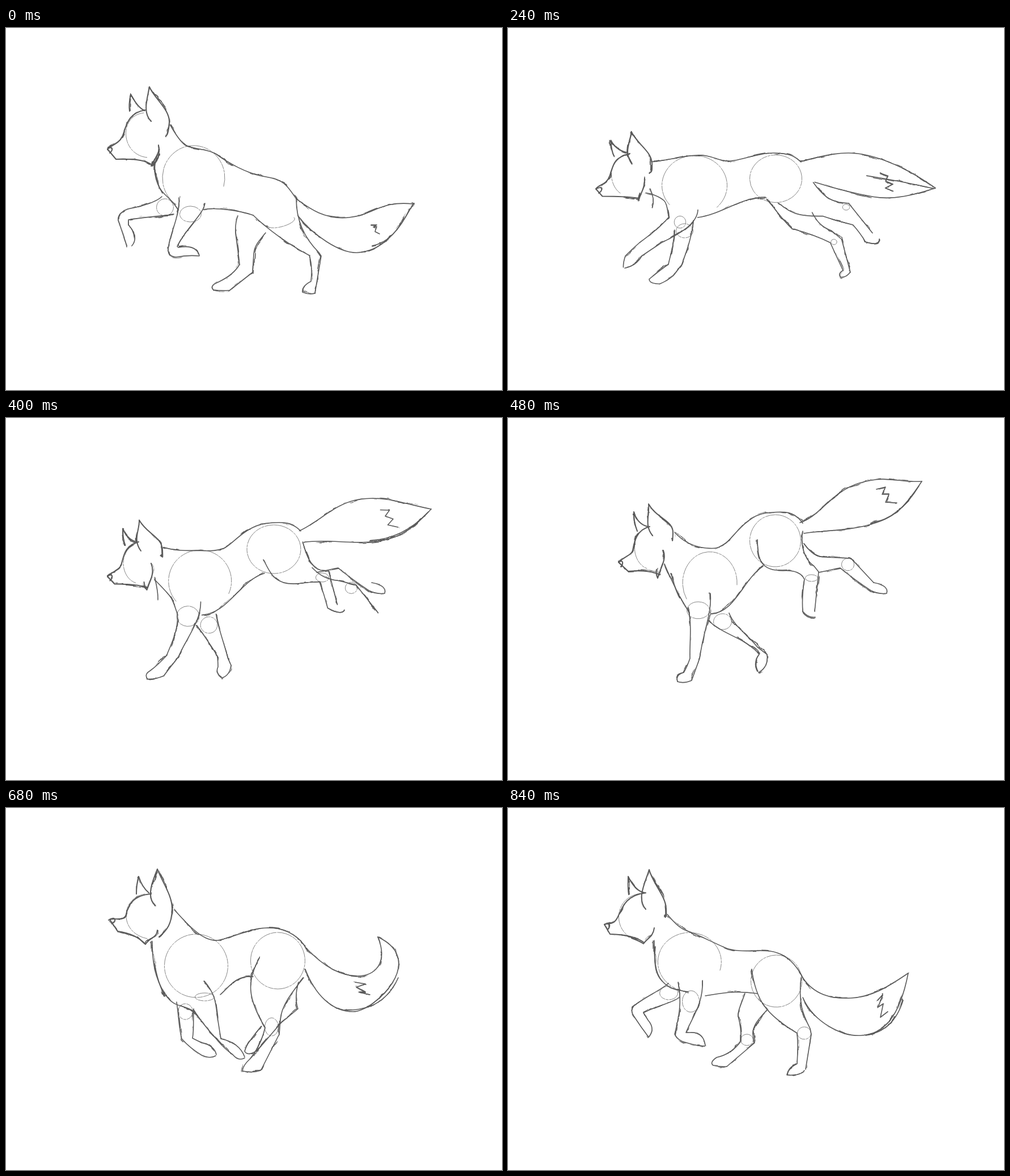
An HTML page without scripts for the animation above (880 ms loop, 875 px wide and 640 px high).

```html
<!DOCTYPE html>
<html lang="en">
<head>
<meta charset="utf-8">
<title>Running fox sketch</title>
<style>
html, body { margin: 0; width: 100%; height: 100%; overflow: hidden; background: #fff; }
svg { display: block; width: 100%; height: 100%; }
path { fill: none; stroke: #5a5a5a; stroke-width: 1.6; stroke-linecap: round; stroke-linejoin: round; }
.bold path { stroke-width: 2; }
.guide path { stroke: #777; stroke-width: .9; stroke-dasharray: 26 1.5 9 2 4 2; }
.run path { animation: run 880ms infinite; }
.speck { stroke-width: 1; opacity: 0; animation: speck 880ms step-end infinite; }
/* Seven poses --a to --g, blended on a 40 ms beat */
@keyframes run {
  0%, to { d: var(--a); animation-timing-function: steps(4); }
  18.1818% { d: var(--b); animation-timing-function: steps(4); }
  36.3636% { d: var(--c); animation-timing-function: steps(4); }
  54.5454% { d: var(--d); animation-timing-function: steps(3); }
  68.1818% { d: var(--e); animation-timing-function: steps(2); }
  77.2727% { d: var(--f); animation-timing-function: steps(4); }
  95.4545% { d: var(--g); animation-timing-function: steps(1); }
}
@keyframes speck { 68.1818% { opacity: 1; } 72.7272% { opacity: 0; } }

.brow { --a:path('M246 145C212 150 212 178 205 192S186 207 179 214L194 232Q240 230 256 241'); --b:path('M212 198C180 205 178 220 172 239S152 255 147 264L162 279Q205 276 231 280');
  --c:path('M218 246C192 252 193 268 187 283S170 297 163 305L171 316Q210 319 232 322'); --d:path('M250 192C224 198 222 225 220 234S203 246 195 255L212 271Q248 268 268 277');
  --e:path('M268 168C236 170 229 188 225 198S200 206 192 209L203 231Q240 236 263 254'); --f:path('M256 152C222 154 215 175 212 188S190 194 183 197L197 218Q228 222 245 240');
  --g:path('M243 150C208 154 202 175 194 192S178 202 170 206L180 223Q222 224 240 238'); }
.nose { --a:path('M179 214q7-5 8-1t-4 8'); --b:path('M147 264q10-4 11 0t-6 8'); --c:path('M163 305q8-5 9-1t-4 8'); --d:path('M195 255q6-4 7 0t-3 8');
  --e:path('M192 209q13-4 14 0t-6 8'); --f:path('M183 197q8-4 9 0t-3 6'); --g:path('M170 206q8-4 9 0t-2 8'); }
.ear { --a:path('M256 165C240 150 250 122 253 104C262 125 290 145 288 168S284 188 283 190'); --b:path('M216 219C200 195 211 180 213 157C220 178 248 195 247 216S241 235 239 240');
  --c:path('M221 262C206 240 222 225 222 209C235 232 258 240 261 262S261 270 260 274'); --d:path('M255 208C240 190 250 170 248 152C262 178 292 180 291 204S290 211 289 213');
  --e:path('M274 201C256 180 276 158 282 131C288 152 304 172 305 190S296 225 285 243'); --f:path('M263 172C247 158 258 130 267 108C275 130 294 155 293 180S285 215 270 228');
  --g:path('M243 179C226 160 243 130 249 109C256 135 278 155 279 178S278 186 276 190'); }
.far-ear { --a:path('M218 147C216 133 219 124 220 117Q233 142 245 146'); --b:path('M181 203C174 190 174 182 173 172Q180 188 204 194');
  --c:path('M193 250C189 240 190 232 190 225Q200 243 214 246'); --d:path('M228 200C222 185 222 175 222 166Q228 187 246 192');
  --e:path('M241 171C240 158 248 146 251 138Q260 152 262 167'); --f:path('M230 152C230 140 232 128 234 121Q240 140 252 150');
  --g:path('M213 153C211 140 212 130 212 121Q225 148 242 150'); }
.cheek { --a:path('M269 207C273 220 262 228 258 244Q268 236 270 222'); --b:path('M244 250C238 262 232 268 228 284Q234 276 240 272');
  --c:path('M238 280C246 300 238 312 233 325Q228 318 225 312'); --d:path('M274 234C280 250 270 262 264 283Q260 275 262 268');
  --e:path('M285 236C278 245 268 250 264 258Q262 250 261 242'); --f:path('M267 216C266 230 254 228 246 241Q240 236 232 228');
  --g:path('M258 212C256 228 246 230 239 240Q234 236 218 230'); }
.scruff { --a:path('M262 237Q262 270 276 292'); --b:path('M265 280Q277 295 276 310'); --c:path('M237 290Q242 310 233 324'); --d:path('M288 275Q295 305 303 318');
  --e:path('M277 265Q270 295 285 320'); --f:path('M262 275Q268 310 280 332'); --g:path('M260 245Q255 290 272 306'); }
.back { --a:path('M290 172C299 188 307 200 316 207S358 213 374 225S425 258 458 263S497 280 512 302'); --b:path('M250 218C275 215 300 212 328 211S360 222 382 231S455 230 482 237S505 250 514 260');
  --c:path('M262 255C290 252 320 240 338 239S370 242 385 239S425 210 460 205S508 206 520 214'); --d:path('M294 202C310 220 328 228 350 230S372 228 383 222S420 172 455 168S505 165 520 186');
  --e:path('M305 190C318 212 332 225 350 229S378 235 395 230S440 188 475 188S525 198 532 222'); --f:path('M297 180C315 200 335 222 353 230S380 233 402 226S445 210 470 212S520 228 530 250');
  --g:path('M281 188C295 205 305 214 318 218S360 237 383 247S440 250 462 253S505 270 520 300'); }
.chest { --a:path('M266 230C256 255 268 283 280 294S298 312 304 322'); --b:path('M238 270C255 272 268 285 272 290S278 305 281 316');
  --c:path('M248 313C262 315 275 318 280 322S285 340 286 352'); --d:path('M276 258C285 280 295 300 300 310S312 330 320 345');
  --e:path('M270 258C275 285 272 310 290 328S315 345 330 348'); --f:path('M258 236C258 270 262 300 280 328S310 345 332 360');
  --g:path('M258 235C258 265 258 290 272 306S300 322 318 325'); }
.belly { --a:path('M348 321C370 317 410 322 436 331'); --b:path('M336 319C370 314 410 308 446 311'); --c:path('M333 351C385 345 410 290 462 287'); --d:path('M358 346C400 345 415 285 450 262');
  --e:path('M386 337C400 332 408 295 434 286'); --f:path('M378 330C395 315 405 296 436 298'); --g:path('M348 332C375 328 400 322 440 328'); }

.hind-front { --a:path('M436 331C462 356 500 384 535 402Q541 420 538 448Q522 456 523 467Q535 472 545 469'); --b:path('M483 330C500 345 510 347 570 349Q600 370 634 402Q638 415 646 426Q658 428 658 418');
  --c:path('M470 288C495 308 510 320 540 316Q560 312 583 294Q605 310 615 330Q652 344 652 328'); --d:path('M440 215C440 250 445 270 485 270Q515 268 523 285Q518 315 520 342Q530 354 542 352');
  --e:path('M461 239C435 275 430 300 440 320Q455 338 476 348Q455 378 439 405Q438 422 448 430'); --f:path('M447 265C425 305 425 335 457 388Q450 420 430 444Q418 455 417 465Q435 469 449 464');
  --g:path('M430 285C437 340 455 365 510 398Q512 420 510 452Q494 460 493 472Q512 474 522 466'); }
.hind-back { --a:path('M512 302C512 345 530 375 552 397L556 403L545 469'); --b:path('M550 308C570 335 585 330 598 340L612 352L658 407');
  --c:path('M527 238C545 265 555 280 570 276L590 268L628 318'); --d:path('M520 200C515 225 523 250 540 262L548 272L541 342');
  --e:path('M530 235C520 280 490 295 492 318L495 348L450 430'); --f:path('M525 300C505 325 485 350 484 375L482 400L450 463');
  --g:path('M517 300C512 345 520 365 533 390L535 400L525 462'); }
.far-hind-front { --a:path('M409 332C400 355 408 375 412 418Q402 436 375 449Q358 456 366 463Q380 465 393 464'); --b:path('M447 315C460 340 470 355 485 375Q515 390 531 414Q530 440 530 455Q512 458 516 468Q525 473 538 466');
  --c:path('M465 290C490 308 500 325 517 335Q560 338 606 345Q630 370 652 402Q650 412 658 413Q668 410 669 398'); --d:path('M548 273C560 271 570 268 586 265Q610 285 640 305Q655 312 668 310Q672 296 645 291');
  --e:path('M495 303C510 308 520 311 540 312Q525 335 518 350Q518 375 525 388Q540 392 546 368'); --f:path('M450 386C445 392 435 405 430 412Q424 420 421 430Q424 436 432 434Q440 432 446 425');
  --g:path('M418 328C410 350 405 360 406 368Q412 390 411 412Q395 435 368 441Q355 450 362 455Q375 458 386 457'); }
.far-hind-back { --a:path('M458 362C445 378 438 385 437 400L435 432L393 465'); --b:path('M515 345C515 365 517 380 530 388L547 405L540 466');
  --c:path('M558 307C575 320 590 325 612 329L630 342L668 398'); --d:path('M522 222C535 240 545 246 560 246L605 248L645 291');
  --e:path('M540 240C530 270 540 290 567 300L538 352L546 368'); --f:path('M516 308C511 325 510 340 515 355L485 380L444 428');
  --g:path('M456 358C440 375 432 385 432 400L434 416L386 457'); }
.fore-front { --a:path('M305 300C308 330 288 365 286 392Q286 404 300 405Q322 401 341 403'); --b:path('M281 317C255 325 230 335 218 345Q215 350 216 362Q214 378 207 389');
  --c:path('M286 352C287 375 260 405 246 414Q222 432 198 444Q192 452 200 457'); --d:path('M318 335C325 370 320 400 321 425Q316 440 310 450Q295 454 299 466');
  --e:path('M322 345C365 355 385 385 398 408Q405 425 420 438Q430 448 438 450'); --f:path('M332 358C345 380 360 395 374 412Q385 425 400 436Q410 448 421 442');
  --g:path('M300 308C308 345 300 375 294 400Q300 412 315 415Q335 421 347 421'); }
.fore-back { --a:path('M351 310C348 330 320 350 302 386L304 388Q335 382 341 402'); --b:path('M340 303C340 325 290 335 270 340L240 358Q238 385 212 392');
  --c:path('M330 340C328 375 290 405 270 420L232 448Q215 455 200 457'); --d:path('M357 310C360 345 345 375 338 425L324 464Q310 470 299 466');
  --e:path('M376 320C395 345 395 375 407 412L436 429Q444 438 438 450'); --f:path('M350 306C370 330 370 345 373 370L379 408Q412 415 421 440');
  --g:path('M343 305C345 345 325 370 314 397L320 397Q345 395 348 420'); }
.far-fore-front { --a:path('M275 298C265 308 240 315 215 320Q196 328 198 340Q205 360 213 385'); --b:path('M266 342C262 360 250 375 240 390Q215 410 193 426Q192 434 215 436');
  --c:path('M320 375C326 395 325 420 326 445Q310 455 305 462Q306 470 320 469'); --d:path('M353 358C375 378 400 385 420 398Q438 410 443 418Q432 432 440 447');
  --e:path('M327 350C340 370 345 400 358 420Q370 438 385 441Q400 447 408 446'); --f:path('M301 343C305 370 305 390 310 408Q325 425 345 437Q360 444 370 438');
  --g:path('M283 310C270 322 240 335 222 350Q215 358 222 368Q235 388 248 405'); }
.far-fore-back { --a:path('M295 330C275 332 240 335 216 339L216 348Q235 370 222 385'); --b:path('M303 333C300 355 285 380 270 392L246 420Q230 425 215 436');
  --c:path('M351 348C350 380 345 410 343 445L337 456Q330 470 320 469'); --d:path('M390 345C400 370 425 385 440 405L457 418Q460 440 442 450');
  --e:path('M357 368C362 385 370 395 376 412L389 413Q405 430 408 446'); --f:path('M331 355C330 375 332 390 329 407L345 415Q368 420 371 436');
  --g:path('M302 335C290 345 265 348 239 362L247 375Q260 390 249 404'); }

.tail-top { --a:path('M512 302C530 315 560 340 605 335S660 305 718 311'); --b:path('M514 258C530 268 580 262 618 274S695 310 738 356');
  --c:path('M520 214C560 190 590 170 630 172S720 190 770 210'); --d:path('M515 185C550 175 570 130 620 115S690 115 730 112');
  --e:path('M532 220C560 240 610 240 635 212S665 160 675 130'); --f:path('M530 248C560 280 590 297 620 297S675 275 656 228');
  --g:path('M520 300C540 330 570 338 605 336S665 320 706 292'); }
.tail-under { --a:path('M515 332C540 365 590 400 622 397S685 375 718 311'); --b:path('M552 310C575 335 610 340 640 347S710 345 738 356');
  --c:path('M530 235C570 230 610 245 650 250S725 245 770 210'); --d:path('M522 204C560 198 600 200 640 188S695 165 730 112');
  --e:path('M538 250C560 275 590 290 630 292S719 193 675 130'); --f:path('M528 285C545 330 575 360 612 360S745 270 656 228');
  --g:path('M520 335C540 380 590 405 625 402S690 375 706 292'); }
.tail-edge { --a:path('M646 385Q685 378 712 320'); --b:path('M620 275Q680 292 738 356'); --c:path('M645 247Q710 250 765 212'); --d:path('M640 186Q690 178 725 120');
  --e:path('M615 283Q668 288 687 236'); --f:path('M598 357Q665 360 692 300'); --g:path('M632 401Q680 395 697 340'); }
.fur { --a:path('M644 348l10 0-5 3 5 0-3 9 8 4'); --b:path('M642 314l12 5 0 10 10 1-14 7 12 4'); --c:path('M671 199l16 5-9 8 16 10-13 7 16 7'); --d:path('M650 126l16-4-6 13 12 0-6 14 20 1');
  --e:path('M633 221l3 10 7 3 5 9 6-6 1 6'); --f:path('M616 308l18 3-16 6 16 9-10 0 18 4'); --g:path('M652 340l9-10-8 22 9-6-5 24 13-10'); }

.skull { --a:path('M243 150C198 155 202 225 250 229'); --b:path('M186 204C172 215 170 245 181 266'); --c:path('M200 258C183 275 188 312 215 318'); --d:path('M248 193C215 200 216 255 245 266');
  --e:path('M243 168C220 180 222 220 248 228'); --f:path('M245 152C200 160 200 222 250 231'); --g:path('M225 153C185 165 185 222 228 234'); }
.ribs { --a:path('M300 312A55 57 0 1 1 384 280'); --b:path('M285 297A52 51 0 1 1 355 308'); --c:path('M285 328A63 55 0 1 1 382 326'); --d:path('M315 320A48 55 0 1 1 404 295');
  --e:path('M341 345A56 56 0 1 1 342 345'); --f:path('M335 335A56 56 0 1 1 336 335'); --g:path('M287 314A56 52 0 1 1 374 287'); }
.hip { --a:path('M508 335A25 8 -15 1 1 461 349'); --b:path('M472 242A42 44 0 1 1 471 242'); --c:path('M474 207A50 40 0 1 1 473 207'); --d:path('M472 171A45 46 0 1 1 471 171');
  --e:path('M478 193A52 54 0 1 1 477 193'); --f:path('M480 220A48 50 0 1 1 479 220'); --g:path('M474 260A45 46 0 1 1 473 260'); }
.shoulder { --a:path('M325 315a19 14 0 1 0 1 0z'); --b:path('M300 325a.5 .5 0 1 0 1 0z'); --c:path('M306 340a20 21 0 1 0 1 0z'); --d:path('M335 325a20 15 0 1 0 1 0z');
  --e:path('M382 346a13 16 0 1 0 1 0z'); --f:path('M350 327a17 7 0 1 0 1 0z'); --g:path('M322 323a15 19 0 1 0 1 0z'); }
.far-shoulder { --a:path('M280 302a15 15 0 1 0 1 0z'); --b:path('M285 335a16 10 0 1 0 1 0z'); --c:path('M337 357a14 15 0 1 0 1 0z'); --d:path('M378 346a16 14 0 1 0 1 0z');
  --e:path('M357 368a.5 .5 0 1 0 1 0z'); --f:path('M316 346a13 14 0 1 0 1 0z'); --g:path('M283 315a16 12 0 1 0 1 0z'); }
.hock { --a:path('M536 402a.5 .5 0 1 0 1 0z'); --b:path('M612 352a.5 .5 0 1 0 1 0z'); --c:path('M580 271a12 10 0 1 0 1 0z'); --d:path('M535 277a11 6 0 1 0 1 0z');
  --e:path('M484 339a11 11 0 1 0 1 0z'); --f:path('M468 371a12 16 0 1 0 1 0z'); --g:path('M522 387a12 11 0 1 0 1 0z'); }
.far-hock { --a:path('M412 418a.5 .5 0 1 0 1 0z'); --b:path('M531 414a.5 .5 0 1 0 1 0z'); --c:path('M618 333a10 9 0 1 0 1 0z'); --d:path('M599 248a11 11 0 1 0 1 0z');
  --e:path('M544 300a10 11 0 1 0 1 0z'); --f:path('M485 380a.5 .5 0 1 0 1 0z'); --g:path('M421 400a11 10 0 1 0 1 0z'); }
</style>
</head>
<body>
<svg viewBox="0 0 875 640">
  <!-- A second, wavering stroke of uneven pressure over each line -->
  <filter id="pencil" x="0" y="0" width="875" height="640" filterUnits="userSpaceOnUse" color-interpolation-filters="sRGB">
    <feTurbulence type="fractalNoise" baseFrequency=".035" numOctaves="3" seed="4" result="noise"/>
    <feColorMatrix in="noise" values="0 0 0 0 0  0 0 0 0 0  0 0 0 0 0  0 0 6 0 -2.3" result="pressure"/>
    <feDisplacementMap in="SourceGraphic" in2="noise" scale="9" xChannelSelector="R" yChannelSelector="G"/>
    <feComposite in2="pressure" operator="in" result="second"/>
    <feMerge><feMergeNode in="SourceGraphic"/><feMergeNode in="second"/></feMerge>
  </filter>
  <g class="run guide">
    <path class="skull"/><path class="ribs"/><path class="hip"/>
    <path class="shoulder"/><path class="far-shoulder"/><path class="hock"/><path class="far-hock"/>
  </g>
  <g filter="url(#pencil)">
    <g class="run">
      <path class="far-hind-front"/><path class="far-hind-back"/>
      <path class="far-fore-front"/><path class="far-fore-back"/>
      <path class="hind-front"/><path class="hind-back"/>
      <path class="fore-front"/><path class="fore-back"/>
      <path class="chest"/><path class="scruff"/><path class="belly"/><path class="back"/>
      <path class="tail-top"/><path class="tail-under"/><path class="tail-edge"/><path class="fur"/>
    </g>
    <g class="run bold">
      <path class="far-ear"/><path class="ear"/><path class="brow"/><path class="nose"/><path class="cheek"/>
    </g>
  </g>
  <path class="speck" d="M25 31v1M367 470l2 2"/>
</svg>
</body>
</html>
```
